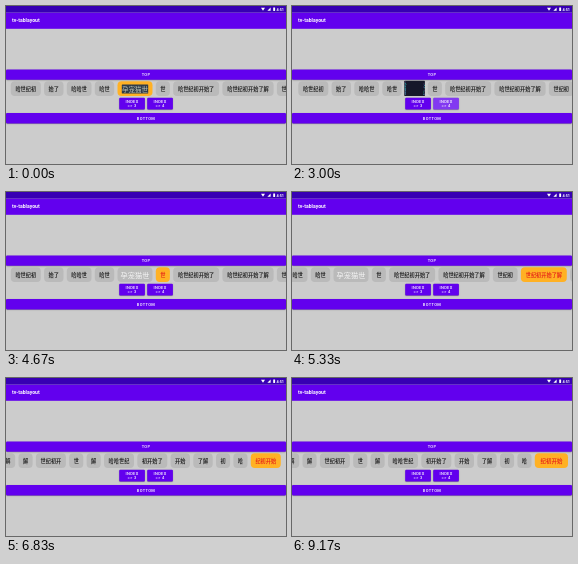
An HTML page with a canvas that plays this animation: 280 by 158 pixels, repeating every 9340 ms.

```html
<!DOCTYPE html>
<html lang="zh">
<head>
<meta charset="utf-8">
<title>tv-tablayout</title>
<style>
html, body { margin: 0; width: 100%; height: 100%; overflow: hidden; background: #ccc; }
canvas { display: block; width: 280px; height: 158px; }
</style>
</head>
<body>
<canvas id="stage"></canvas>
<script>
const W = 280, H = 158, LOOP = 9340, STEP = 1000 / 6, LAST_STEP = 55;
const CJK = '"Noto Sans CJK SC", "Noto Sans CJK", sans-serif';
const LATIN = 'Roboto, sans-serif';
const GLYPH = 5.3, PAD = 4.4, GAP = 3.3, PICTURE = 4;
const TAB_Y = 75.2, TAB_H = 14.9, TAB_BASE = 84.5;
const PURPLE = '#6200ee', LIT = '#8239f1', ORANGE = '#ffb124', RED = '#e8301a';

const labels = ['哈世纪初', '始了', '哈哈世', '哈世', '孕宠猫世', '世',
  '哈世纪初开始了', '哈世纪初开始了解', '世纪初', '世纪初开始了解', '解',
  '世纪初开', '世', '解', '哈哈世纪', '初开始了', '开始', '了解', '初', '哈', '纪初开始'];

// [time, scroll]
const scrollKeys = [[0, 0], [500, 0], [667, -1.5], [2000, -1.5], [2167, 0], [2667, 0],
  [2833, -1.5], [3333, -1.5], [3500, 0], [4840, 0], [6000, 164.6], [6833, 335.6],
  [7000, 337.6], [LOOP, 337.6]];

const canvas = document.getElementById('stage');
const ctx = canvas.getContext('2d');
const dpr = window.devicePixelRatio || 1;
canvas.width = W * dpr;
canvas.height = H * dpr;
ctx.scale(dpr, dpr);

function sample(keys, t) {
  for (let i = 1; i < keys.length; i++) {
    const [t0, a] = keys[i - 1], [t1, b] = keys[i];
    if (t <= t1) return a + (b - a) * (t - t0) / (t1 - t0);
  }
  return keys[keys.length - 1][1];
}

function box(x, y, w, h, r, color) {
  ctx.fillStyle = color;
  ctx.beginPath();
  ctx.roundRect(x, y, w, h, r);
  ctx.fill();
}

function text(str, x, y, font, color, align = 'center', spacing = 0) {
  ctx.font = font;
  ctx.fillStyle = color;
  ctx.textAlign = align;
  ctx.textBaseline = 'alphabetic';
  ctx.letterSpacing = spacing + 'px';
  ctx.fillText(str, x, y);
}

function triangle(...p) {
  ctx.fillStyle = '#fff';
  ctx.beginPath();
  ctx.moveTo(p[0], p[1]);
  ctx.lineTo(p[2], p[3]);
  ctx.lineTo(p[4], p[5]);
  ctx.fill();
}

function button(x, y, w, h, lines, lit) {
  ctx.save();
  ctx.shadowColor = 'rgba(0,0,0,.35)';
  ctx.shadowBlur = 1.2 * dpr;
  ctx.shadowOffsetY = 0.5 * dpr;
  box(x, y, w, h, 1.1, lit ? LIT : PURPLE);
  ctx.restore();
  const top = y + h / 2 + 1.45 - (lines.length - 1) * 2.35;
  lines.forEach((s, i) =>
    text(s, x + w / 2, top + i * 4.7, '500 4px ' + LATIN, '#fff', 'center', 0.34));
}

function darkPicture(x, y, w, h) {
  box(x, y, w, h, 0.5, '#16182a');
  let seed = 7;
  const rnd = () => (seed = seed * 16807 % 2147483647) / 2147483647;
  const colors = ['#2fb4b8', '#3f83a0', '#5a5596', '#2d8c86'];
  for (let i = 0; i < 30; i++) {
    const side = i % 3 ? 0.2 : w - 1.8;
    ctx.fillStyle = colors[Math.floor(rnd() * 4)];
    ctx.fillRect(x + side + rnd(), y + rnd() * (h - 1), 0.8, 0.9);
  }
}

function pictureTab(x, w, focused) {
  const cx = x + w / 2;
  if (focused) box(cx - 13.2, 78.6, 26.4, 8.8, 0.5, '#2f3c48');
  text(labels[PICTURE], cx, 85.5, (focused ? 6.5 : 7.2) + 'px ' + CJK,
    focused ? '#c3c8b8' : '#f5f5f5');
}

function stateAt(t) {
  let focus = -1, lit = 0, selected = PICTURE;
  if (t < 600) focus = PICTURE;
  else if (t < 2400) lit = 3;
  else if (t < 3450) lit = 4;
  else if (t < 4300) focus = PICTURE;
  else focus = Math.min(20, Math.max(5, Math.round(5 + 9 * (t - 4667) / 1333)));
  if (t > 1990 && t < 2700) selected = 3;
  return { focus, lit, selected, grown: t > 6950 };
}

function drawTabs(t, s) {
  let x = 4.8 - sample(scrollKeys, t);
  labels.forEach((label, i) => {
    const focused = i === s.focus;
    const dark = i === PICTURE && s.lit && s.selected === PICTURE;
    let content = label.length * GLYPH;
    if (i === PICTURE) content = dark ? 10.7 : 26.2;
    if (i === 20 && s.grown) content += 3.2;
    const w = content + PAD * 2;
    if (x < W && x + w > 0) {
      if (dark) {
        darkPicture(x - 0.7, 74.8, 20.6, 15.2);
      } else {
        box(x, TAB_Y, w, TAB_H, 4, focused ? ORANGE : '#bababa');
        if (i === PICTURE) pictureTab(x, w, focused);
        else {
          const red = focused || (s.lit && i === s.selected);
          const size = i === 20 && s.grown ? 5.5 : 5.2;
          text(label, x + w / 2, TAB_BASE, `bold ${size}px ${CJK}`, red ? RED : '#2a2a2a');
        }
      }
    }
    x += w + GAP;
  });
}

function draw(t) {
  const s = stateAt(t);
  ctx.fillStyle = '#ccc';
  ctx.fillRect(0, 0, W, H);
  ctx.fillStyle = PURPLE;
  ctx.fillRect(0, 6.5, W, 16.3);
  ctx.fillStyle = '#3700b3';
  ctx.fillRect(0, 0, W, 6.5);

  triangle(255, 1.7, 259, 1.7, 257, 4.8);
  triangle(264.6, 1.5, 264.6, 4.8, 261.4, 4.8);
  box(267.2, 1.5, 1.9, 3.4, 0.3, '#fff');
  text('4:51', 278, 4.7, '700 3.8px ' + LATIN, '#fff', 'right');
  text('tv-tablayout', 6, 16.4, '700 5.1px ' + LATIN, '#fff', 'left');

  button(0, 63.4, W, 10.4, ['TOP']);
  drawTabs(t, s);
  button(113.2, 91.7, 25.7, 11.8, ['INDEX', '=> 3'], s.lit === 3);
  button(141.2, 91.7, 25.7, 11.8, ['INDEX', '=> 4'], s.lit === 4);
  button(0, 107, W, 10.4, ['BOTTOM']);
}

const start = performance.now();
function tick() {
  const t = (performance.now() - start) % LOOP;
  draw(Math.min(LAST_STEP, Math.floor((t + 5) / STEP)) * STEP);
  requestAnimationFrame(tick);
}
tick();
</script>
</body>
</html>
```
